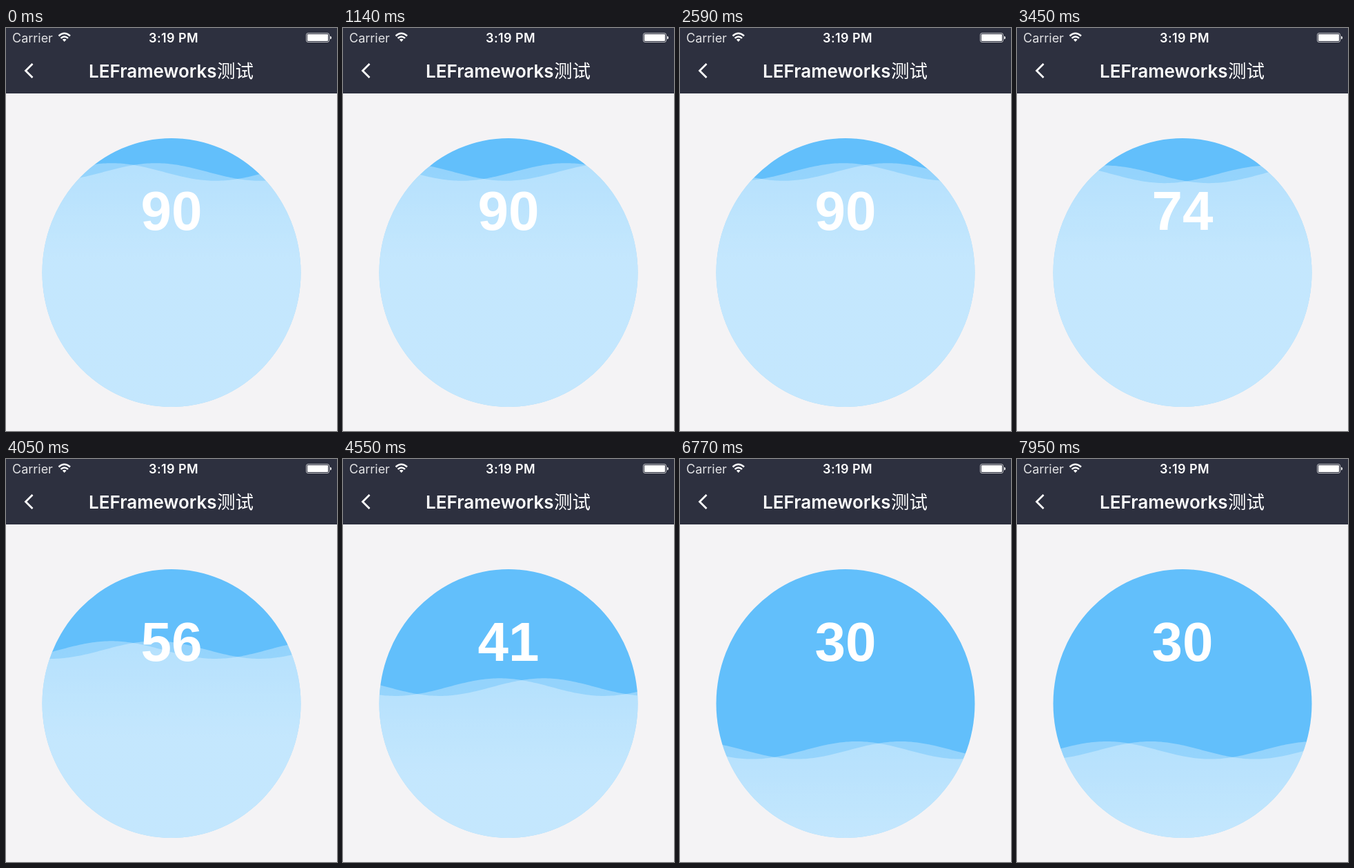
Animation of 480x585 px, one loop 8000 ms. Source, as an HTML page:

```html
<!DOCTYPE html>
<html lang="en">
<head>
<meta charset="utf-8">
<title>Water level</title>
<style>
  html, body { margin: 0; width: 100%; height: 100%; overflow: hidden; background: #f4f3f5; }
  svg { display: block; width: 480px; height: 585px; }
  text { fill: #fff; font-family: Inter, "Noto Sans CJK SC", "Noto Sans CJK", sans-serif; }
  .status { font-size: 18px; }
  .title { font-size: 26px; font-weight: 600; }
  .cjk { font-family: "Noto Sans CJK SC", "Noto Sans CJK", sans-serif; font-size: 26.5px; font-weight: 500; }
  .number { font: bold 80px "Liberation Sans", Arial, sans-serif; text-anchor: middle; }
  .line { fill: none; stroke: #fff; }
</style>
</head>
<body>
<svg viewBox="0 0 480 585">
  <defs>
    <clipPath id="bowl"><ellipse cx="240" cy="355" rx="187.5" ry="195"/></clipPath>
    <linearGradient id="water" gradientUnits="userSpaceOnUse" x1="0" y1="0" x2="0" y2="130">
      <stop offset="0" stop-color="#fff" stop-opacity=".32"/>
      <stop offset="1" stop-color="#fff" stop-opacity=".39"/>
    </linearGradient>
  </defs>

  <rect width="480" height="585" fill="#f4f3f5"/>
  <rect width="480" height="95" fill="#2d303f"/>

  <text class="status" x="9" y="20.5" fill-opacity=".86">Carrier</text>
  <g class="line" stroke-width="2.4">
    <path d="M76.5 11.5Q84.500 4 93 11.500M79.500 14.800Q84.700 10 90 14.800"/>
    <path d="M81.800 16.800Q84.700 14.500 87.600 16.800L84.700 20Z" fill="#fff" stroke="none"/>
  </g>
  <text class="status" x="243" y="20.5" text-anchor="middle" font-weight="600" letter-spacing=".4">3:19 PM</text>
  <rect class="line" x="435.5" y="7.500" width="33" height="13" rx="2.500" stroke-opacity=".7"/>
  <rect x="437" y="9" width="30" height="10" rx="1" fill="#fff"/>
  <path d="M470 11.500q2 .5 2 2.500t-2 2.500z" fill="#fff"/>

  <path class="line" d="M38.500 52L28.500 62L38.500 72" stroke-width="2.800"/>
  <text class="title" x="120" y="72">LEFrameworks</text>
  <text class="cjk" x="306" y="72">测试</text>

  <g clip-path="url(#bowl)">
    <rect x="50" y="158" width="380" height="395" fill="#62bffb"/>
    <path class="wave" fill="url(#water)"/>
    <path class="wave" fill="url(#water)"/>
  </g>
  <text class="number" x="240" y="292.500">90</text>
</svg>
<script>
  const LOOP = 8000, WAVELENGTH = 302, AMPLITUDE = 12.8;
  const WAVE_SPEED = 0.149, WAVE_START = 336, WAVE_SHIFT = 32;
  const COUNT_START = 2912, COUNT_STEP = 33;
  const HIGH = 209, LOW = 422.8, FALL_START = 3420, FALL_TIME = 1980;

  const waves = [...document.querySelectorAll('.wave')];
  const number = document.querySelector('.number');
  const clamp = (v, lo, hi) => Math.min(hi, Math.max(lo, v));

  // The wave has a trough at x = 0 and fills everything below it.
  let shape = '';
  for (let x = -WAVELENGTH; x <= 3 * WAVELENGTH; x += 3) {
    const y = AMPLITUDE * Math.cos(2 * Math.PI * x / WAVELENGTH);
    shape += `${shape ? 'L' : 'M'}${x} ${y.toFixed(2)}`;
  }
  shape += `V400H${-WAVELENGTH}Z`;
  waves.forEach(wave => wave.setAttribute('d', shape));

  function draw(t) {
    const fall = clamp((t - FALL_START) / FALL_TIME, 0, 1);
    const level = HIGH + (LOW - HIGH) * fall;
    const trough = WAVE_START + WAVE_SPEED * t;
    waves.forEach((wave, i) => {
      const x = (trough + (i ? WAVE_SHIFT : -WAVE_SHIFT)) % WAVELENGTH;
      wave.setAttribute('transform', `translate(${x.toFixed(2)} ${level.toFixed(2)})`);
    });
    number.textContent = 90 - clamp(Math.floor((t - COUNT_START) / COUNT_STEP), 0, 60);
  }

  const start = performance.now();
  function tick() {
    draw((performance.now() - start) % LOOP);
    requestAnimationFrame(tick);
  }
  tick();
</script>
</body>
</html>
```
